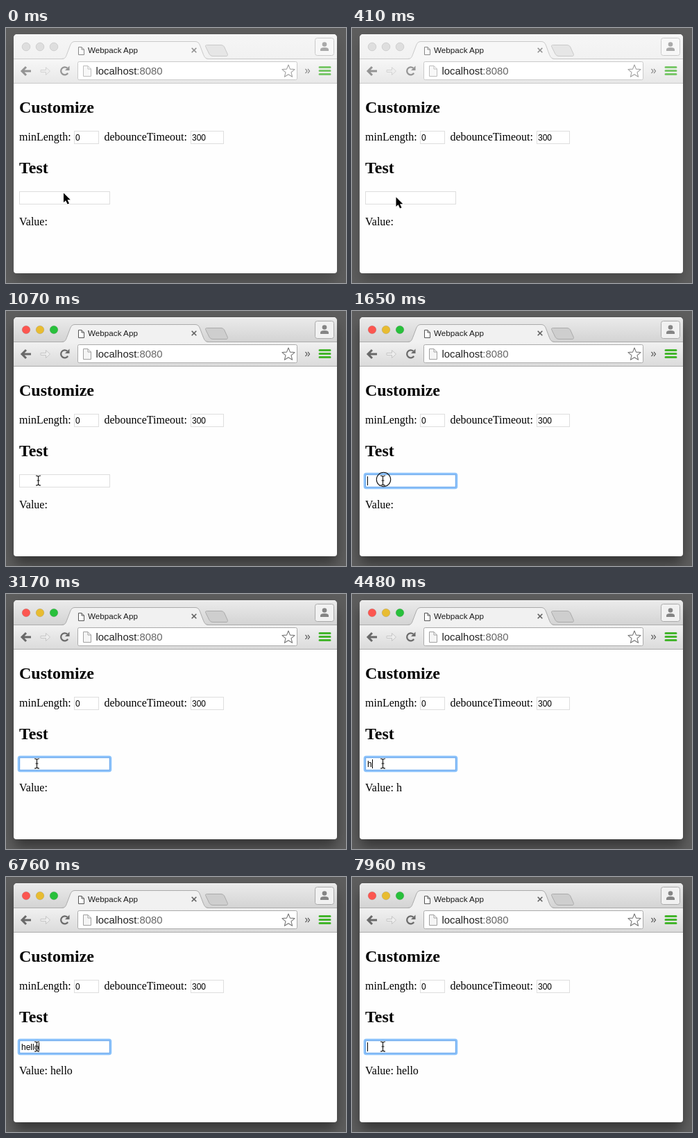
An HTML page that plays this animation: 490x367 px, repeating every 8 s.

```html
<!DOCTYPE html>
<html lang="en">
<head>
<meta charset="utf-8">
<title>Debounced input</title>
<style>
html, body { margin: 0; width: 100%; height: 100%; overflow: hidden; background: #5b5b5b; }
svg { display: block; }
text { white-space: pre; }
.serif { font: 16px "Liberation Serif", Times, serif; }
.head { font: bold 24px "Liberation Serif", Times, serif; }
.field { font: 12px "Liberation Sans", Arial, sans-serif; }
.crisp { shape-rendering: crispEdges; }
#stage {
  --bar1: #ebebeb; --bar2: #d3d3d3; --tool1: #f1f1f1; --tool2: #dbdbdb;
  --edge: #ababab; --red: #fc5650; --yellow: #e8bc31; --green: #28c03b;
  --rim: #0002; --plus: #cecece; --icons: 1; --shadow: .42;
}
#stage.idle {
  --bar1: #f6f6f6; --bar2: #f1f1f1; --tool1: #f7f7f7; --tool2: #e8e8e8;
  --edge: #cacaca; --red: #dedede; --yellow: #dedede; --green: #dedede;
  --rim: #c9c9c9; --plus: #e6e6e6; --icons: .68; --shadow: .22;
}
#icons { opacity: var(--icons); }
#shade { opacity: var(--shadow); }
.edge { stroke: var(--edge); }
</style>
</head>
<body>
<svg id="stage" class="idle" width="490" height="367" viewBox="0 0 490 367">
  <defs>
    <linearGradient id="bar" x2="0" y2="1">
      <stop style="stop-color:var(--bar1)"/><stop offset="1" style="stop-color:var(--bar2)"/>
    </linearGradient>
    <linearGradient id="tool" x2="0" y2="1">
      <stop style="stop-color:var(--tool1)"/><stop offset="1" style="stop-color:var(--tool2)"/>
    </linearGradient>
    <filter id="soft" x="-20%" y="-20%" width="140%" height="140%"><feGaussianBlur stdDeviation="9"/></filter>
    <filter id="glow" x="-10%" y="-50%" width="120%" height="200%"><feGaussianBlur stdDeviation=".7"/></filter>
    <clipPath id="frame"><path d="M11 14a5 5 0 0 1 5-5H472a5 5 0 0 1 5 5V349a4 4 0 0 1-4 4H15a4 4 0 0 1-4-4Z"/></clipPath>
  </defs>

  <rect width="490" height="367" fill="#5d5d5d"/>
  <rect id="shade" x="12" y="20" width="464" height="344" rx="8" filter="url(#soft)"/>

  <g clip-path="url(#frame)">
    <rect x="11" y="9" width="466" height="344" fill="#fefefe"/>
    <rect x="11" y="9" width="466" height="36" fill="url(#bar)"/>
    <path class="edge" d="M11 44.5H477"/>
    <rect x="11" y="45" width="466" height="34" fill="url(#tool)"/>
    <path class="edge" d="M11 79.5H477"/>
    <path d="M11 9.5H477" stroke="#fff" opacity=".6"/>
  </g>

  <g stroke-width=".8" style="stroke:var(--rim)">
    <circle cx="29" cy="27" r="5.8" style="fill:var(--red)"/>
    <circle cx="49" cy="27" r="5.8" style="fill:var(--yellow)"/>
    <circle cx="69" cy="27" r="5.8" style="fill:var(--green)"/>
  </g>

  <path d="M80 45C86 44.500 86 42 88 37L92.500 25Q94.500 19.500 99 19.500H273Q277.500 19.500 279.500 25L284 37C286 42 287 44.500 292 45Z" style="fill:var(--tool1)"/>
  <path class="edge" fill="none" d="M80 44.500C86 44 86 42 88 37L92.500 25Q94.500 19.500 99 19.500H273Q277.500 19.500 279.500 25L284 37C286 42 287 44 292 44.500"/>
  <path class="edge" d="M289.500 24.500H310Q313 24.500 314.500 27L319 37Q320.500 40.500 317 40.500H298Q294.500 40.500 293 37.500L288 27.500Q286.500 24.500 289.500 24.500Z" style="fill:var(--plus)"/>
  <rect class="edge" x="445.500" y="14.500" width="27" height="25" rx="3" style="fill:var(--tool1)"/>

  <rect class="edge" x="103.500" y="48.500" width="316" height="26" rx="2" fill="#fff"/>

  <g id="icons" fill="none">
    <g fill="#858585"><circle cx="459" cy="23.500" r="3.300"/><path d="M453 33V31Q453 28 459 28T465 31V33Z"/></g>
    <path d="M104.500 27.500H109L112.500 31V38.500H104.500ZM109 27.500V31H112.500" fill="#fff" stroke="#555"/>
    <path d="M267.700 28.700L274.300 35.300M274.300 28.700L267.700 35.300" stroke="#606060" stroke-width="1.600"/>
    <path id="back" d="M36 62H24M29 56L23 62L29 68" stroke="#696969" stroke-width="3"/>
    <path d="M50 60.500H57.500V56.500L63.500 62L57.500 67.500V63.500H50Z" fill="#eee" stroke="#c6c6c6"/>
    <path d="M89.200 65A5.500 5.500 0 1 1 88.300 57.700" stroke="#6b6b6b" stroke-width="2.300"/>
    <path d="M91.500 54.500V61H85Z" fill="#6b6b6b"/>
    <path d="M111.500 54.500H118L122.500 59V69.500H111.500ZM118 54.500V59H122.500" fill="#f5f5f5" stroke="#a0a0a0"/>
    <path id="star" fill="#fff" stroke="#777" stroke-width="1.100" stroke-linejoin="round"/>
    <path d="M431.500 58.800L434 62L431.500 65.200M435 58.800L437.500 62L435 65.200" stroke="#555" stroke-width="1.200"/>
    <path d="M452 56.500H467M452 61.500H467M452 66.500H467" stroke="#43b52c" stroke-width="3" stroke-linecap="round"/>
  </g>

  <text class="field" x="118" y="36" fill="#1c1c1c" style="font-size:11.700px">Webpack App</text>
  <text class="field" x="129.500" y="67" fill="#222" style="font-size:14.900px">localhost<tspan fill="#666">:8080</tspan></text>

  <text class="head" x="19" y="122">Customize</text>
  <text class="serif" x="19" y="162">minLength:</text>
  <text class="serif" x="141.500" y="162">debounceTimeout:</text>
  <text class="head" x="19" y="209">Test</text>
  <g fill="#fff" stroke="#dedede" class="crisp">
    <rect x="98.500" y="148.500" width="35" height="18"/>
    <rect x="266.500" y="148.500" width="47" height="18"/>
    <rect x="19.500" y="235.500" width="130" height="18"/>
  </g>
  <text class="field" x="100" y="162">0</text>
  <text class="field" x="268" y="162">300</text>

  <g id="focus" fill="none">
    <rect x="18.500" y="234.500" width="132" height="20" rx="2" stroke="#8cc3fb" stroke-width="3.600" filter="url(#glow)"/>
    <rect x="19.500" y="235.500" width="130" height="18" stroke="#74acec"/>
  </g>
  <text id="typed" class="field" x="22" y="249"></text>
  <rect id="caret" class="crisp" y="238" width="1" height="13"/>
  <text id="value" class="serif" x="19" y="284"></text>

  <g id="pointer">
    <circle id="ring" cx="1.500" cy="-1" r="10.200" fill="none" stroke="#111" stroke-width="1.100"/>
    <path id="arrow" d="M0 0V13.500L3.100 10.700L5.600 16L8 15L5.500 9.700H9.800Z" stroke="#fff" stroke-width="1.800" paint-order="stroke" stroke-linejoin="round"/>
    <g id="beam" fill="none">
      <path class="bar" stroke="#fff" stroke-width="2.600" opacity=".8"/>
      <path class="bar" stroke="#111" stroke-width="1.100"/>
    </g>
  </g>
</svg>
<script>
const LOOP = 8000;
const $ = id => document.getElementById(id);
const show = (id, on) => $(id).style.display = on ? "" : "none";

const WORD = "hello";
const CARET_X = [22, 29, 35, 38, 40, 47];

// [time, value]: each value holds until the next entry
const letters = [[0, 0], [3200, 1], [4600, 0], [5820, 1], [6020, 2], [6130, 3], [6250, 4],
  [6460, 5], [7390, 4], [7540, 3], [7690, 2], [7810, 1], [7960, 0]];
const shown = [[0, 0], [3500, 1], [4900, 0], [6760, 5]];
const blink = [[0, 0], [1650, 1], [2160, 0], [2670, 1], [3170, 0], [3200, 1], [3970, 0],
  [4480, 1], [5400, 0], [5820, 1], [7270, 0], [7390, 1]];
const press = [[0, 0], [710, 1], [790, 0], [1650, 1], [1770, 0]];

const at = (track, t) => track.reduce((v, [start, next]) => t >= start ? next : v, 0);
const ease = p => p * p * (3 - 2 * p);

// eased move made of equal 40 ms steps
function glide(t, start, steps) {
  const n = Math.floor((t - start) / 40) + 1;
  return ease(Math.min(Math.max(n / steps, 0), 1));
}

function starPath(cx, cy, outer, inner) {
  const pts = Array.from({ length: 10 }, (_, i) => {
    const r = i % 2 ? inner : outer, a = i * Math.PI / 5 - Math.PI / 2;
    return (cx + r * Math.cos(a)).toFixed(2) + " " + (cy + r * Math.sin(a)).toFixed(2);
  });
  return "M" + pts.join("L") + "Z";
}

$("star").setAttribute("d", starPath(407, 62.5, 9.5, 4.2));
document.querySelectorAll(".bar").forEach(p => p.setAttribute("d",
  "M-3 -6.500Q.5 -6.500 .5 -4.500Q.5 -6.500 4 -6.500M-3 7.500Q.5 7.500 .5 5.500Q.5 7.500 4 7.500M.5 -4.500V5.500M-1.500 .5H2.500"));

function draw(t) {
  const count = at(letters, t);
  const a = glide(t, 210, 6), b = glide(t, 790, 10);
  const x = 83 - 19.5 * a - 19.5 * b, y = 237.5 + 6 * a;

  $("stage").classList.toggle("idle", t < 710);
  $("pointer").setAttribute("transform", `translate(${x} ${y})`);
  show("arrow", t < 790);
  show("beam", t >= 790);
  show("ring", at(press, t));
  show("focus", t >= 1650);
  show("caret", at(blink, t));
  $("caret").setAttribute("x", CARET_X[count]);
  $("typed").textContent = WORD.slice(0, count);
  $("value").textContent = "Value: " + WORD.slice(0, at(shown, t));
}

const begin = performance.now();
function tick() {
  draw((performance.now() - begin) % LOOP);
  requestAnimationFrame(tick);
}
tick();
</script>
</body>
</html>
```
